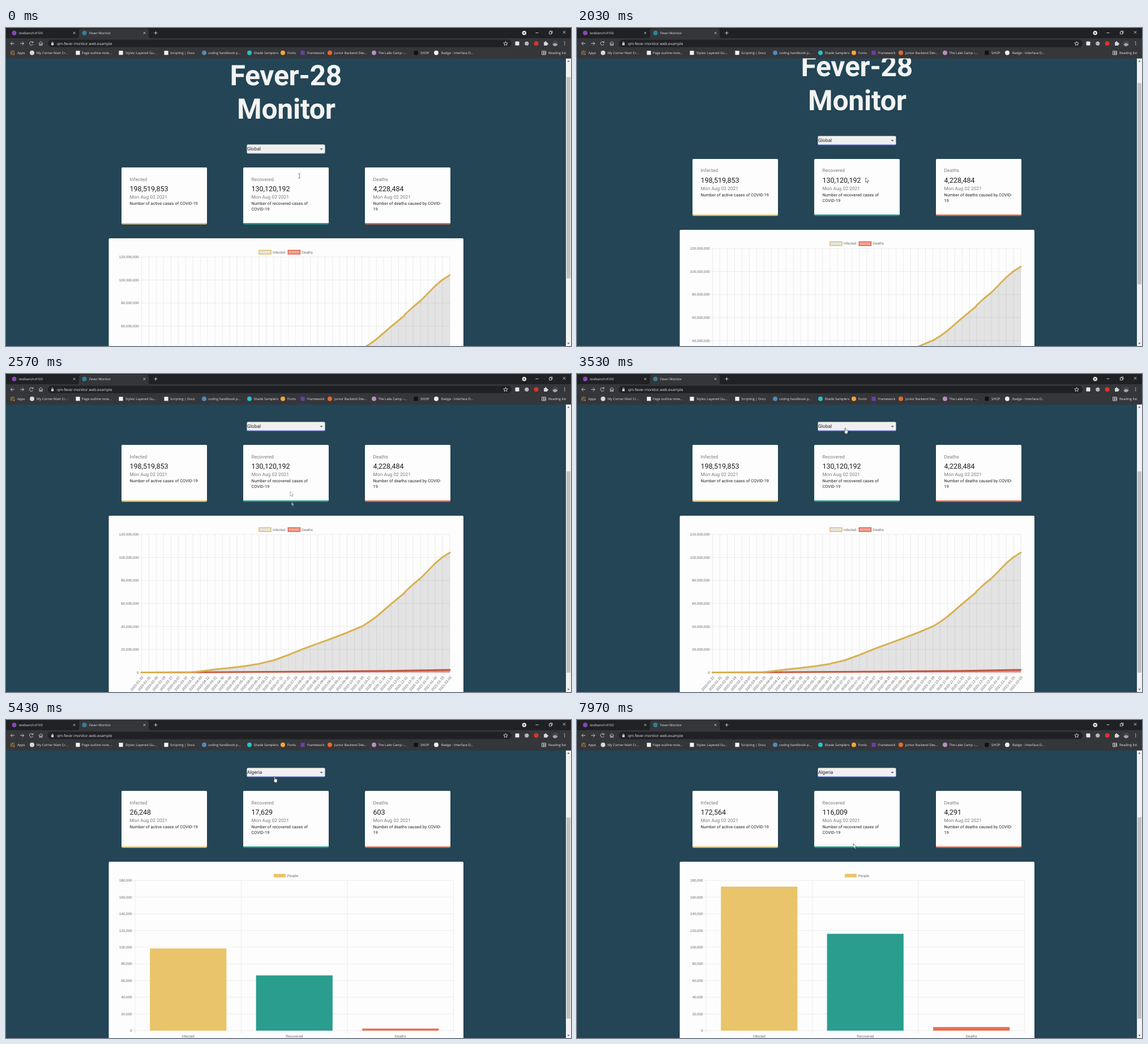
Recreate the animation shown at these times as an HTML page. Size 998 by 561 pixels, loop 8000 ms.

```html
<!DOCTYPE html>
<html lang="en">
<head>
<meta charset="utf-8">
<title>Fever Monitor</title>
<style>
html, body { margin: 0; width: 100%; height: 100%; overflow: hidden; background: #234555; }
svg { display: block; width: 100%; height: 100%; }
text { font-family: Roboto, sans-serif; text-rendering: geometricPrecision; white-space: pre; }
.title { font-size: 49.9px; font-weight: 700; fill: #f3f3f3; text-anchor: middle; letter-spacing: -.3px; }
.body { font-size: 8.32px; letter-spacing: .0094em; fill: #222; }
.muted { fill: #797979; }
.count { font-size: 12.48px; fill: #1c1c1c; }
.small { font-size: 7.28px; letter-spacing: .0107em; fill: #222; }
.axis { font-family: "Liberation Sans", Arial, sans-serif; font-size: 6.24px; fill: #666; }
.end { text-anchor: end; }
.mid { text-anchor: middle; }
.ui { font-family: "Open Sans", sans-serif; font-size: 5.85px; fill: #e4e5e7; }
.url { font-size: 6.6px; }
.icon { fill: none; stroke: #d5d6d8; stroke-width: .9; }
</style>
</head>
<body>
<svg id="stage" viewBox="0 0 998 561"></svg>
<script>
const YELLOW = '#e9c46a', TEAL = '#2a9d8f', RED = '#e76f51';
const LOOP = 8000, PICK_AT = 4930, DATA_AT = 5239.5, BLEND = 30;
const END_SCROLL = 156;

const rect = (x, y, w, h, fill, more = '') =>
  `<rect x="${x}" y="${y}" width="${w}" height="${h}" fill="${fill}" ${more}/>`;
const text = (x, y, str, cls, more = '') => `<text x="${x}" y="${y}" class="${cls}" ${more}>${str}</text>`;
const dot = (x, y, r, fill) => `<circle cx="${x}" cy="${y}" r="${r}" fill="${fill}"/>`;
const path = (d, more = 'class="icon"') => `<path d="${d}" ${more}/>`;
const range = (n, fn) => Array.from({ length: n }, (_, i) => fn(i)).join('');
const number = n => Math.round(n).toLocaleString('en-US');

const cards = [
  { name: 'Infected', x: 204, color: YELLOW, world: 198519853, local: 172564,
    lines: ['Number of active cases of COVID-19'] },
  { name: 'Recovered', x: 419, color: TEAL, world: 130120192, local: 116009,
    lines: ['Number of recovered cases of', 'COVID-19'] },
  { name: 'Deaths', x: 634, color: RED, world: 4228484, local: 4291,
    lines: ['Number of deaths caused by COVID-', '19'] }
];

const drawCard = c => {
  const x = c.x + 14.5;
  return rect(c.x, 125, 151, 100.5, c.color, 'rx="2"') +
    path(`M${c.x} 223V127q0-2 2-2h147q2 0 2 2v96z`, 'fill="#fdfdfd"') +
    text(x, 148.5, c.name, 'body muted') +
    text(x, 167, number(c.world), 'count', 'data-count') +
    text(x, 180, 'Mon Aug 02 2021', 'body muted') +
    c.lines.map((line, i) => text(x, 190.9 + i * 10.4, line, 'small')).join('');
};

function lineChart() {
  const left = 239.5, right = 784, top = 283, base = 526.5, labels = 43;
  const stepX = (right - left) / (labels - 1), stepY = (base - top) / 6;
  const first = Date.UTC(2020, 0, 22);
  const curve = [[left, 526.5], [328, 525.9], [343, 524.5], [369, 521.3], [395, 518.5], [421, 515.4],
    [447, 511.2], [473, 505], [499, 495.5], [525, 485], [551, 475.3], [577, 466], [603, 456], [629, 445],
    [642, 437], [655, 427.5], [681, 405], [703, 387], [706, 383], [719, 371], [732, 360.5], [741, 351.5],
    [758, 334], [771, 323], [right, 315]].join(' L');
  const deaths = `M${left} ${base} L343 526.3 L500 525.2 L680 523.7 L${right} 521.9`;
  const grid = 'stroke="#000" stroke-opacity=".13" stroke-width=".55"';
  const swatch = (x, fill, stroke) => rect(x, 271.2, 21.2, 6.6, fill, `stroke="${stroke}" stroke-width="1.5"`);
  const stroke = color => `fill="none" stroke="${color}" stroke-width="3" stroke-linecap="round" stroke-linejoin="round"`;
  return swatch(446.9, '#e5e5e5', '#e0bd69') + text(471, 276.5, 'Infected', 'axis') +
    swatch(498.3, '#f4a296', '#dc6149') + text(522.2, 276.5, 'Deaths', 'axis') +
    range(7, i => path(`M${left - 5} ${top + i * stepY}H${right}`, grid) +
      text(234.5, top + 2.2 + i * stepY, number((6 - i) * 2e7), 'axis end')) +
    range(labels, i => {
      const x = left + i * stepX;
      const day = new Date(first + i * 9 * 864e5).toISOString().slice(0, 10);
      return path(`M${x} ${top}V${base + 5}`, grid) +
        text(0, 2, day, 'axis end', `transform="translate(${x + 2} 534) rotate(-50)"`);
    }) +
    path(deaths + `V${base}H${left}z`, 'fill="#f00" fill-opacity=".4"') + path(deaths, stroke('#d95f46')) +
    path(`M${curve} V${base}H${left}z`, 'fill="#000" fill-opacity=".1"') +
    path('M' + curve, stroke('#d8b253'));
}

function barChart() {
  const left = 228, right = 790.5, top = 283, base = 548;
  const stepY = (base - top) / 9, slot = (right - left) / 3;
  const grid = 'stroke="#000" stroke-opacity=".12" stroke-width=".55"';
  return rect(473, 271.4, 21, 6.3, YELLOW) + text(496.8, 276.5, 'People', 'axis') +
    range(10, i => path(`M${left - 5} ${top + i * stepY}H${right}`, grid) +
      text(222.5, top + 2.2 + i * stepY, number((9 - i) * 2e4), 'axis end')) +
    range(4, i => path(`M${left + i * slot} ${top}V${base + 5}`, grid)) +
    cards.map((c, i) => {
      const mid = left + (i + .5) * slot;
      return rect(mid - 67.6, base, 135.2, 0, c.color, 'data-bar') + text(mid, 559.6, c.name, 'axis mid');
    }).join('');
}

const page = () =>
  text(494.3, -20.5, 'Fever-28', 'title') + text(494.8, 39, 'Monitor', 'title') +
  rect(425.5, 84.4, 138, 16, '#f0f0f0', 'rx="2"') +
  rect(425.5, 99.6, 138, 1, '#3f51d0', 'id="underline"') +
  text(426, 95.4, 'Global', 'body', 'id="country"') +
  path('M554.4 91.4h5.4l-2.7 2.8z', 'fill="#666"') +
  cards.map(drawCard).join('') +
  rect(181.5, 250, 626.5, 430, '#fdfdfd', 'rx="2"') +
  `<g id="world">${lineChart()}</g><g id="local">${barChart()}</g>`;

// icon x, label x, label, icon colour, square icon
const bookmarks = [
  [46, 54, 'My Corner Mart Cr...', '#d8d9db'], [127, 134, 'Page outline note...', '#f2f2f2', 1],
  [203, 211, 'Styles: Layered Gu...', '#f2f2f2', 1], [283, 290, 'Scripting | Docs', '#f2f2f2', 1],
  [350, 357, 'coding handbook p...', '#4b8bbe'], [430, 437.5, 'Shade Samplers', '#20c4cb'],
  [489, 497, 'Fonts', '#f4a638'], [524, 532, 'Framework', '#6a3fa8', 1],
  [572, 580, 'Junior Backend Dev...', '#e8682c'], [650, 657.5, 'The Lake Camp –...', '#b58fc0'],
  [724, 732, 'SHOP', '#111', 1], [760, 769, 'Badge - Interface D...', '#eee']
];

const cross = (x, y, r) => path(`M${x - r} ${y - r}l${2 * r} ${2 * r}m0 ${-2 * r}l${-2 * r} ${2 * r}`);

const browser = () =>
  rect(0, 0, 998, 18, '#202124') + rect(0, 18, 998, 35.6, '#35363a') +
  path('M125 18q4 0 4-4V5q0-4 4-4h115q4 0 4 4v9q0 4 4 4z', 'fill="#35363a"') +
  dot(14.5, 8.7, 4, '#8a46b8') + text(22.8, 10.8, 'testbench:4100', 'ui') + cross(120.5, 8.7, 1.8) +
  dot(138.5, 8.7, 4, '#2f8299') + text(147, 10.8, 'Fever Monitor', 'ui') + cross(244.5, 8.7, 1.8) +
  path('M261.5 8.7h6m-3-3v6') +
  dot(915.3, 8.7, 3.8, '#e0e0e0') + path('M913.5 8h3.6l-1.8 2.2z', 'fill="#202124"') +
  path('M935.5 8.5h5M959.5 6.8h4v4h-4zM961 6.8V5.3h4v4h-1.5') + cross(986, 7.5, 2.3) +
  rect(74, 20.8, 819, 13, '#202124', 'rx="6.5"') +
  path('M14.8 27.3H8.2m3-3l-3 3 3 3M25 27.3h6.6m-3-3l3 3-3 3') +
  path('M47.5 25.5a3.2 3.2 0 1 0 .2 3M47.8 23.5v2.4h-2.4') +
  path('M57.8 27.3l3.7-3.3 3.7 3.3M59 27v3.6h1.8v-2.4h1.4v2.4H64V27') +
  rect(80, 26.7, 4.2, 3.6, '#d5d6d8') + path('M81 27v-1.3a1.1 1.1 0 0 1 2.2 0V27') +
  text(90, 29.6, 'qm-fever-monitor.web.example', 'ui url') +
  path('M882.5 23.6l1.1 2.5 2.7.2-2.1 1.8.7 2.6-2.4-1.4-2.4 1.4.7-2.6-2.1-1.8 2.7-.2z') +
  rect(899.5, 23.7, 7, 7, '#e8e8e8', 'rx="1"') + dot(919.8, 27.3, 3.6, '#b5b8b2') + dot(936.6, 27.3, 4, '#d9342b') +
  path('M950 25h2a1.2 1.2 0 1 1 2.2 0h2v2a1.2 1.2 0 1 1 0 2v2h-6z', 'fill="#d5d6d8"') +
  dot(970, 27.3, 5, '#454454') + path('M965.5 29q4.5-5 9 0-1.8 3.3-4.5 3.3t-4.5-3.3', 'fill="#aaa0ad"') +
  range(3, i => dot(986.7, 24.6 + i * 2.6, .8, '#d5d6d8')) +
  range(9, i => rect(8 + i % 3 * 2.7, 40.3 + (i / 3 | 0) * 2.7, 1.7, 1.7,
    ['#d95445', '#e3b341', '#4a9b60'][(i + (i / 3 | 0)) % 3])) +
  text(20, 46, 'Apps', 'ui') +
  bookmarks.map(([x, tx, label, color, square]) =>
    (square ? rect(x - 3.6, 40.2, 7.2, 7.2, color) : dot(x, 43.8, 4, color)) + text(tx, 46, label, 'ui')).join('') +
  path('M946.5 40.8h7v6.2h-7zM949 41v6M949 43h4.5M949 45h4.5') + text(958, 46, 'Reading list', 'ui');

const scrollbar = () =>
  rect(989, 53.6, 9, 507.4, '#f1f1f1') +
  path('M991.4 59.6h4.2l-2.1-2.4zM991.4 555.4h4.2l-2.1 2.4z', 'fill="#505050"') +
  rect(990, 62, 7, 355, '#c1c1c1', 'id="thumb"');

const cursorShapes = {
  beam: 'M-1.8-4h1.4l.4.4.4-.4h1.4M0-3.6v7.2M-1.8 4h1.4l.4-.4.4.4h1.4',
  arrow: 'M0 0v8.3l1.9-1.8 1.3 3 1.4-.6-1.3-2.9h2.6z',
  hand: 'M-.8 7V.8q0-.8.8-.8t.8.8v3l3 .7q.9.2.8 1.2l-.5 3.3-.6 1.5H.3L-2.6 6.4q.6-1 1.8.6z'
};

// time, x, y and the shape held until the next entry
const cursorKeys = [
  [0, 518.3, 261, 'beam'], [900, 518.3, 261, 'arrow'], [1060, 512.6, 267.5, 'arrow'], [1670, 510.3, 266, 'arrow'],
  [2380, 509, 262, 'arrow'], [2540, 504, 225, 'arrow'], [2570, 502, 207, 'arrow'], [2740, 488, 101, 'hand'],
  [3060, 474, 95, 'hand'], [3560, 474, 95, 'arrow'], [4020, 464, 122, 'arrow'], [4300, 459, 137, 'arrow'],
  [4930, 459, 137, 'arrow'], [5330, 474, 101, 'hand'], [5800, 477, 96, 'hand'], [6530, 476, 97.5, 'hand'],
  [7430, 478, 95, 'hand'], [7500, 479, 102, 'arrow'], [7900, 488, 218, 'arrow'], [LOOP, 488, 218, 'arrow']
];

// start, duration, distance
const wheel = [[1004, 138, -35], [1831, 300, 52], [2140, 200, 52], [2340, 200, 52]];

const clamp = v => Math.min(1, Math.max(0, v));
const easeOut = (p, power) => 1 - (1 - clamp(p)) ** power;
const scrollAt = t => wheel.reduce((y, [at, time, by]) => y + by * easeOut((t - at) / time, 3), 35);

function cursorAt(t) {
  const i = Math.max(0, cursorKeys.findIndex(k => k[0] > t) - 1);
  const [t0, x0, y0, shape] = cursorKeys[i], [t1, x1, y1] = cursorKeys[i + 1];
  const p = clamp((t - t0) / (t1 - t0));
  return { x: x0 + (x1 - x0) * p, y: y0 + (y1 - y0) * p, shape };
}

// Runs straight up to the last 333, then settles exponentially.
function countAt(end, elapsed) {
  const leg = 1250, tail = 333;
  if (elapsed < leg) return (end - tail) * elapsed / leg;
  const p = clamp((elapsed - leg) / leg);
  return end - tail + tail * (1 - 2 ** (-10 * p)) * 1024 / 1023;
}

const pointer = id => path('', `id="${id}" fill="#fff" stroke="#222" stroke-width=".6"`);
document.getElementById('stage').innerHTML =
  rect(0, 0, 998, 561, '#234555') +
  `<g id="view"><g id="page">${page()}</g></g><use id="trail" href="#page" opacity=".5"/>` +
  scrollbar() + browser() + pointer('cursor') + pointer('cursorTrail');

const $ = id => document.getElementById(id);
const counts = document.querySelectorAll('[data-count]'), bars = document.querySelectorAll('[data-bar]');
const move = (node, x, y) => node.setAttribute('transform', `translate(${x} ${y})`);
const show = (node, on) => node.setAttribute('display', on ? 'inline' : 'none');

function placeCursor(node, { x, y, shape }, opacity) {
  move(node, x, y);
  node.setAttribute('d', cursorShapes[shape]);
  node.setAttribute('opacity', opacity);
}

function render(t) {
  const scroll = scrollAt(t), before = scrollAt(t - BLEND);
  move($('view'), 0, END_SCROLL - scroll);
  move($('trail'), 0, END_SCROLL - before);
  show($('trail'), Math.abs(scroll - before) > 3);
  move($('thumb'), 0, scroll * .704);

  $('underline').setAttribute('opacity', t < 1770 ? .3 : 1);
  $('country').textContent = t < PICK_AT ? 'Global' : 'Algeria';

  const local = t >= DATA_AT;
  show($('world'), !local);
  show($('local'), local);
  const grow = easeOut((t - DATA_AT) / 1000, 4);
  cards.forEach((c, i) => {
    counts[i].textContent = number(local ? countAt(c.local, t - DATA_AT) : c.world);
    const height = c.local / 180000 * 265 * grow;
    bars[i].setAttribute('y', 548 - height);
    bars[i].setAttribute('height', height);
  });

  const now = cursorAt(t), last = cursorAt(Math.max(0, t - BLEND));
  const fast = Math.hypot(now.x - last.x, now.y - last.y) > 10;
  placeCursor($('cursor'), now, fast ? .6 : 1);
  placeCursor($('cursorTrail'), last, fast ? .5 : 0);
}

let start;
function tick(now) {
  start ??= now;
  render((now - start) % LOOP);
  requestAnimationFrame(tick);
}
render(0);
requestAnimationFrame(tick);
</script>
</body>
</html>
```
